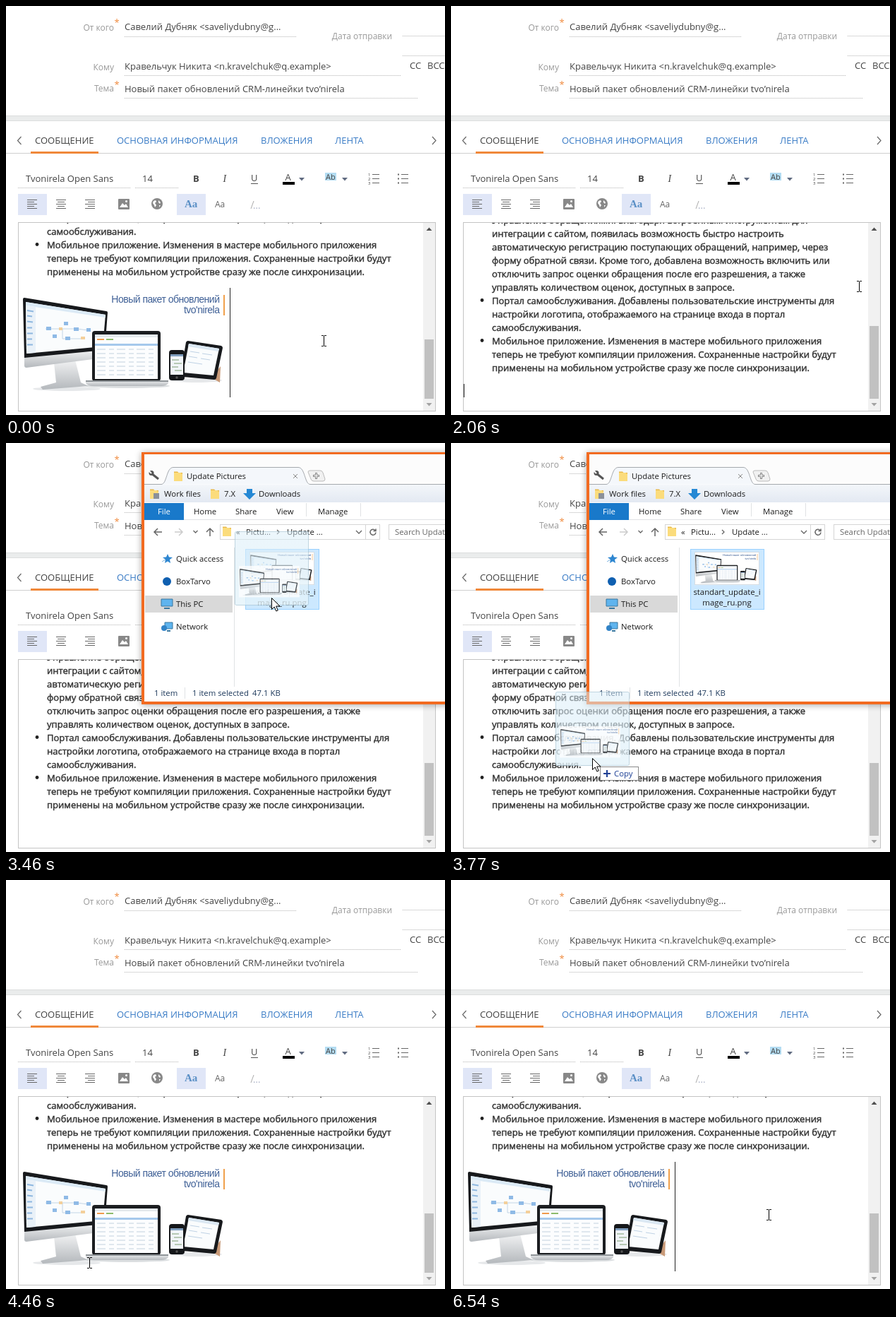
An HTML page for the animation above (6940 ms loop, 622x579 px).

```html
<!DOCTYPE html>
<html lang="ru">
<head>
<meta charset="utf-8">
<title>Вставка изображения в письмо</title>
<style>
  html, body { margin: 0; width: 100%; height: 100%; overflow: hidden; background: #fff; }
  svg { display: block; }
  text { font: 13px "Open Sans", sans-serif; fill: #444; white-space: pre; }
  .label { font-size: 12px; fill: #999; text-anchor: end; }
  .star { fill: #f0883a; }
  .tab { fill: #3a7cc6; }
  .dots { stroke: #b4b4b4; stroke-dasharray: 1 1; fill: none; shape-rendering: crispEdges; }
  .line { fill: none; stroke: #666; }
  .doc text { font-size: 13.04px; fill: #333; stroke: #333; stroke-width: .45px; }
  .win text { font-size: 11.35px; fill: #1c1c1c; }
  .win .mid { text-anchor: middle; }
  .win .status { fill: #1e395b; }
  .pic text { font: 14px "Liberation Sans", sans-serif; letter-spacing: -.5px; fill: #3f6096; text-anchor: end; }
  .thin { shape-rendering: crispEdges; }
</style>
</head>
<body>
<svg width="622" height="579" viewBox="0 0 622 579">
  <defs>
    <clipPath id="page"><rect x="18" y="307" width="573" height="266"/></clipPath>
    <linearGradient id="veil" x2="0" y2="1">
      <stop offset="0" stop-color="#d9edf8" stop-opacity=".5"/>
      <stop offset="1" stop-color="#e4f3fa" stop-opacity=".8"/>
    </linearGradient>
    <linearGradient id="metal" x2="0" y2="1">
      <stop offset="0" stop-color="#f1f2f3"/><stop offset="1" stop-color="#b4b8bc"/>
    </linearGradient>
    <linearGradient id="bar" x2="0" y2="1">
      <stop offset="0" stop-color="#f3f6fa"/><stop offset="1" stop-color="#e3e9f2"/>
    </linearGradient>
    <g id="folder">
      <path d="M0 1.5h5l1.5 1.5H12V15H0z" fill="#e9b949"/>
      <path d="M0 3h9l3 2v10H0z" fill="#fbdc7c"/>
    </g>
    <g id="pic" class="pic">
      <rect width="296" height="153" fill="#fff"/>
      <ellipse cx="66" cy="143" rx="48" ry="3" fill="#e6e8ea"/>
      <ellipse cx="152" cy="139" rx="60" ry="3" fill="#dcdfe1"/>
      <ellipse cx="250" cy="131" rx="36" ry="3" fill="#e6e8ea"/>
      <path d="M48 106l30-4 8 32 11 5-65 5-3-4 22-6z" fill="url(#metal)"/>
      <path d="M6 97l97-9v13L9 113q-3 0-3-3z" fill="url(#metal)"/>
      <path d="M4 16q0-2 2-2l116 19q2 0 2 2l-4 53L6 99z" fill="#17191c"/>
      <path d="M8 20l113 18-4 45L9 93z" fill="#fafcfd"/>
      <path d="M8 20l113 18v4L8 25z" fill="#dbeaf6"/>
      <path d="M8 25l14 2v65L9 93z" fill="#e9f1f8"/>
      <path d="M10 32l9 1.500m-9 6l7 1m-7 7l8 1m-8 8h7m-7 8h8m-8 8h7m-7 8h8" stroke="#8fb8e0" stroke-width="2"/>
      <path d="M36 58h40m-16 0v14h32m-12-14l16 2" fill="none" stroke="#b5cbe0" stroke-width=".8"/>
      <path d="M37 55h7v5h-7zM62 48h6v5h-6zM76 56h7v5h-7zM94 57h6v5h-6zM46 66h6v5h-6zM64 69h7v5h-7z" fill="#8fbae6"/>
      <path d="M55 56h5v4h-5zM86 69h6v4h-6z" fill="#f3cf9a"/>
      <rect x="102" y="61" width="97" height="71" rx="4" fill="#1b1d20"/>
      <rect x="106" y="66" width="89" height="63" fill="#fcfdfe"/>
      <path d="M106 66h89v4h-89z" fill="#e5eaee"/>
      <path d="M109 72h10v2h-10z" fill="#ef9a4c"/><path d="M122 72h10v2h-10z" fill="#8dbb6c"/>
      <path d="M106 79h89v3h-89z" fill="#a5c8ec"/>
      <path d="M109 87h82m-82 6h82m-82 6h82m-82 6h82m-82 6h82m-82 6h82m-82 6h82" stroke="#c3d1e0" stroke-dasharray="12 5 7 4" stroke-width="1.2"/>
      <path d="M93 131h117v4q-3 4-10 4h-97q-7 0-10-4z" fill="url(#metal)"/>
      <path d="M93 131h117v2H93z" fill="#8f9498"/>
      <path d="M271 127l13-16-1 23z" fill="#c99a78"/>
      <path d="M235 77q1-2 3-2l47 7q2 1 2 3l-9 43q-1 2-3 2l-45-4q-3 0-3-2z" fill="#17191c"/>
      <path d="M239 79l43 7-8 38-43-4z" fill="#fafcfd"/>
      <path d="M239 79l43 7-1 4-43-7z" fill="#dbe8f3"/>
      <path d="M241 90l13 2m4 1l14 2m-33 2l12 2m5 1l13 2m-31 3l20 3" stroke="#bfd2e5"/>
      <rect x="211" y="88" width="22" height="43" rx="4" fill="#15171a"/>
      <rect x="213" y="94" width="18" height="29" fill="#f1f5f9"/>
      <path d="M213 94h18v3h-18z" fill="#7f9dbd"/>
      <path d="M215 102h10m-7 5h11m-14 5h9m-5 5h10" stroke="#b7c9b5" stroke-width="2"/>
      <circle cx="222" cy="127" r="1.700" fill="#555"/>
      <text x="282.500" y="21">Новый пакет обновлений</text>
      <text x="282.500" y="36">tvo'nirela</text>
      <path d="M288 10h2v29h-2z" fill="#f0a04b"/>
    </g>
  </defs>

  <!-- Header -->
  <text class="label" x="153" y="35">От кого</text>
  <text class="star" x="153.500" y="28">*</text>
  <text x="168" y="34">Савелий Дубняк &lt;saveliydubny@g...</text>
  <text class="label" x="547" y="47">Дата отправки</text>
  <text class="label" x="153" y="91">Кому</text>
  <text x="168" y="90">Кравельчук Никита &lt;n.kravelchuk@q.example></text>
  <text x="572" y="89">CC</text><text x="597" y="89">BCC</text>
  <text class="label" x="153" y="121">Тема</text>
  <text class="star" x="153.500" y="116">*</text>
  <text x="168" y="122">Новый пакет обновлений CRM-линейки tvo’nirela</text>
  <path class="dots" d="M168 43.500H412M168 98.500H560M168 130.500H584M562 42.500H622M562 70.500H622M17 257.500H176M183 257.500H244"/>

  <!-- Tabs -->
  <rect y="155" width="622" height="8" fill="#eaecec"/>
  <path class="thin" d="M0 155.500H622M0 162.500H622" stroke="#dcdede"/>
  <path class="thin" d="M0 208.500H622" stroke="#cfcfcf"/>
  <rect x="35" y="206" width="96" height="3" fill="#f0883a"/>
  <path class="line" d="M21.500 185l-5 5.500 5 5.500M604 185l5 5.500-5 5.500" stroke-width="1.200"/>
  <text x="41" y="195">СООБЩЕНИЕ</text>
  <text class="tab" x="157" y="195">ОСНОВНАЯ ИНФОРМАЦИЯ</text>
  <text class="tab" x="361" y="195">ВЛОЖЕНИЯ</text>
  <text class="tab" x="466" y="195">ЛЕНТА</text>

  <!-- Toolbar -->
  <g fill="#e0e6f7">
    <rect id="listOn" x="543" y="230" width="41" height="30"/>
    <rect x="17" y="266" width="41" height="30"/><rect x="242" y="266" width="41" height="30"/>
  </g>
  <text x="28" y="249">Tvonirela Open Sans</text>
  <text x="193" y="249">14</text>
  <text x="265" y="249" style="font-weight:700">B</text>
  <text x="307.500" y="249" style="font:italic 14px 'Liberation Serif',serif">I</text>
  <text x="347" y="248">U</text><path class="thin" d="M347 251.500h10" stroke="#555"/>
  <text x="395.500" y="247">A</text><path d="M392 249h17v4h-17z" fill="#000"/>
  <path d="M415 243h8l-4 4.500zM476 243h8l-4 4.500z" fill="#5f6a80"/>
  <path d="M452 236h16v11h-16z" fill="#b3dcf2"/>
  <text x="453" y="246" style="font-size:11px">Ab</text>
  <path class="line thin" d="M519 238.500h10m-10 6h10m-10 6h10M560 238.500h10m-10 6h10m-10 6h10"/>
  <path d="M555 237.500h2v2h-2zm0 6h2v2h-2zm0 6h2v2h-2z" fill="#666"/>
  <g><text x="513" y="241" style="font-size:6px">1</text><text x="513" y="247" style="font-size:6px">2</text><text x="513" y="253" style="font-size:6px">3</text></g>
  <path class="line thin" d="M30 274.500h14m-14 3h10m-10 3h14m-14 3h10m-10 3h14M71 274.500h14m-12 3h10m-12 3h14m-12 3h10m-12 3h14M112 274.500h14m-10 3h10m-14 3h14m-10 3h10m-14 3h14"/>
  <rect x="159" y="273" width="16" height="15" rx="1" fill="#888"/>
  <path d="M161 285l4-6 3 3 2-2 3 5z" fill="#fff"/><circle cx="170.500" cy="276.500" r="1.500" fill="#fff"/>
  <circle cx="214" cy="280" r="8" fill="#888"/>
  <path d="M209 276l3-1 1 2-2 2 2 3-2 3-1-3-2-3zM216 275l3 3-1 2-2-2zM217 282h2l-2 3z" fill="#fff"/>
  <text x="253" y="285" style="font:bold 15px 'Liberation Serif',serif;fill:#5b90c6">Aa</text>
  <text x="296" y="285" style="font-size:12px;fill:#666">Aa</text>
  <path d="M347 287l4-11" stroke="#aaa"/><text x="350" y="287" style="fill:#a0a8c0">...</text>

  <!-- Editor -->
  <rect class="thin" x="17.500" y="306.500" width="591" height="267" fill="#fff" stroke="#c4c4c4"/>
  <rect x="591" y="307" width="17" height="266" fill="#f1f1f1"/>
  <path d="M595.500 318h8l-4-4.500z" fill="#505050"/><path d="M595.500 562h8l-4 4.500z" fill="#a3a3a3"/>
  <rect id="thumb" x="593" width="13" fill="#c1c1c1"/>
  <g clip-path="url(#page)">
    <g id="doc" class="doc"></g>
    <use id="inserted" href="#pic" x="20" y="399"/>
    <rect id="caret" class="thin" width="1" fill="#222"/>
  </g>

  <!-- File window -->
  <g id="win" class="win">
    <rect x="192" y="13" width="440" height="357" fill="#f26b21" style="filter:drop-shadow(0 1px 5px rgba(0,0,0,.35))"/>
    <rect x="196" y="16" width="430" height="350" fill="#fff"/>
    <path d="M196 16h430v42H196z" fill="#fcfcfc"/>
    <path d="M196 59h430v25H196z" fill="url(#bar)"/>
    <path d="M196 58.500h24c8 0 7-24 17-24h177c10 0 9 24 17 24h191" fill="#f4f7fb" stroke="#a5a9ae"/>
    <path d="M206 43l10 8" stroke="#555" stroke-width="3"/><circle cx="206" cy="42.500" r="3.500" fill="#555"/><path d="M202 39l4 4" stroke="#fcfcfc" stroke-width="2"/>
    <use href="#folder" x="238" y="39"/><text x="256" y="51">Update Pictures</text>
    <path class="line" d="M407 44l6 6m0-6l-6 6" style="stroke:#888"/>
    <path d="M428 41q0-2 3-2h14q3 0 4 3l3 9q0 3-3 3h-13q-3 0-4-3z" fill="#f1f1f1" stroke="#bbb"/>
    <path d="M439.500 42v9m-4.500-4.500h9" stroke="#888" stroke-width="3"/><path d="M439.500 43v7m-3.500-3.500h7" stroke="#fff"/>
    <use href="#folder" x="204" y="64"/><path d="M209 71h8v8h-8z" fill="#8a9099"/><text x="224" y="76">Work files</text>
    <use href="#folder" x="290" y="64"/><text x="309" y="76">7.X</text>
    <path d="M341 65h8v6h5l-9 9-9-9h5z" fill="#2588d4"/><text x="358" y="76">Downloads</text>
    <path d="M196 85h430v25H196z" fill="#fff"/>
    <path d="M196 85h56v24h-56z" fill="#1979ca"/>
    <text x="215" y="101" style="fill:#fff">File</text><text x="266" y="101">Home</text><text x="325" y="101">Share</text>
    <text x="383" y="101">View</text><text x="442" y="101">Manage</text>
    <path class="thin" d="M252 108.500H622M425.500 85v19M502.500 85v19M323.500 148V345M253.500 346v16" stroke="#e0e2e4"/>
    <path class="line" d="M221 126h-11m5-5l-5 5 5 5M289 132v-11m-5 5l5-5 5 5" stroke-width="1.500"/>
    <path class="line" d="M239 126h11m-5-5l5 5-5 5" style="stroke:#ccc" stroke-width="1.500"/>
    <path class="line" d="M265.500 124l3 3 3-3M384 123l3 3-3 3M496 124l4 4 4-4" stroke-width="1.300"/>
    <path class="thin" d="M303.500 115.500h226v21h-226zM509.500 116v21M622 115.500h-79.500v21H622" fill="none" stroke="#d5d5d5"/>
    <use href="#folder" x="307" y="117"/><text x="326" y="130">«</text>
    <text x="340" y="130">Pictu...</text><text x="398" y="130">Update ...</text>
    <path class="line" d="M523 123.500a4 4 0 1 0 1 3m0-5v3h-3.500" stroke-width="1.500"/>
    <text x="551" y="130" style="fill:#666">Search Update Pictures</text>
    <path d="M197 216h124v24H197z" fill="#d9d9d9"/>
    <path d="M229 157l2 4.500 5 .5-4 3 1 5-4-2.500-4 2.500 1-5-4-3 5-.5z" fill="#2e86d0"/><path d="M221 168l5-3" stroke="#7db4e0"/>
    <circle cx="228" cy="196" r="6" fill="#0f5fb0"/>
    <path d="M220 221h16v10h-16z" fill="#5fb4ee" stroke="#38779f"/><path d="M224 234h8" stroke="#38779f" stroke-width="2"/>
    <path d="M225 254h11v9h-11z" fill="#5fb4ee" stroke="#38779f"/><circle cx="224" cy="262" r="4" fill="#3183c7"/><path d="M228 266h5" stroke="#38779f" stroke-width="2"/>
    <text x="241" y="168">Quick access</text><text x="241" y="200">BoxTarvo</text>
    <text x="241" y="232">This PC</text><text x="241" y="264">Network</text>
    <rect id="item" class="thin" x="339.500" y="150.500" width="104" height="85"/>
    <use href="#pic" transform="translate(345 154) scale(.308)"/>
    <path class="thin" d="M345.500 154.500h91v46h-91z" fill="none" stroke="#d5dce2"/>
    <text class="mid" x="391" y="215">standart_update_i</text><text class="mid" x="391" y="230">mage_ru.png</text>
    <text class="status" x="210" y="358">1 item</text>
    <g id="picked"><text class="status" x="264" y="358">1 item selected</text><text class="status" x="349" y="358">47.1 KB</text></g>
  </g>

  <!-- Pointer -->
  <g id="pointer">
    <g id="ghost">
      <rect x="-51.500" y="-93.500" width="104" height="104" rx="2" fill="url(#veil)" stroke="#9dbccd" stroke-opacity=".6"/>
      <use href="#pic" transform="translate(-46 -45) scale(.29)" opacity=".75"/>
    </g>
    <g id="copy" class="win">
      <rect class="thin" x="11.500" y="12.500" width="54" height="19" fill="#fff" stroke="#8a8a8a"/>
      <path d="M21 17v10m-5-5h10" stroke="#1c3f94" stroke-width="2"/>
      <text x="31" y="26" style="fill:#1c3f94">Copy</text>
    </g>
    <path id="arrow" d="M.5.500v16l3.700-3.500 2.600 6 2.500-1-2.600-6h5.300z" fill="#fff" stroke="#000"/>
    <path id="beam" class="thin" d="M-3 -7.500h3m1 0h3M.5-7v14M-3 7.500h3m1 0h3" fill="none" stroke="#000"/>
  </g>
</svg>
<script>
const LOOP = 6940, STEP = 76, LINE = 19, TOP = 308, SCROLL = 136;
const $ = id => document.getElementById(id);
const show = (id, on) => { $(id).style.display = on ? '' : 'none'; };
const set = (id, attrs) => { for (const k in attrs) $(id).setAttribute(k, attrs[k]); };

const typed = 'синхронизации.';
const lines = [
  'Управление обращениями. Благодаря встроенным инструментам для',
  'интеграции с сайтом, появилась возможность быстро настроить',
  'автоматическую регистрацию поступающих обращений, например, через',
  'форму обратной связи. Кроме того, добавлена возможность включить или',
  'отключить запрос оценки обращения после его разрешения, а также',
  'управлять количеством оценок, доступных в запросе.',
  'Портал самообслуживания. Добавлены пользовательские инструменты для',
  'настройки логотипа, отображаемого на странице входа в портал',
  'самообслуживания.',
  'Мобильное приложение. Изменения в мастере мобильного приложения',
  'теперь не требуют компиляции приложения. Сохраненные настройки будут',
  'применены на мобильном устройстве сразу же после '
];
const bullet = (row, id = '') =>
  `<circle ${id} cx="44" cy="${TOP + LINE * row - 5.5}" r="2.4" fill="#222"/>`;
$('doc').innerHTML =
  lines.map((s, i) => `<text x="58" y="${TOP + LINE * i}">${s}</text>`).join('') +
  bullet(6) + bullet(9) + bullet(12, 'id="newBullet"');
const lastLine = $('doc').querySelectorAll('text')[lines.length - 1];

// Pointer moves: start time, then [step, x, y] keys
const moves = [
  [0, [[0, 450, 474]]],
  [100, [[0, 537, 518]]],
  [1830, [[0, 545, 494], [5, 600, 332]]],
  [2760, [[0, 606, 212], [3, 440, 209], [5, 386, 208]]],
  [3460, [[0, 376, 219], [4, 200, 446], [9, 90, 545]]],
  [4230, [[0, 88, 549]]],
  [4380, [[0, 88, 549], [8, 325, 489], [9, 345, 486]]],
  [5150, [[0, 364, 484], [4, 444, 475], [5, 450, 474]]]
];

function pointerAt(t) {
  const [start, keys] = moves.filter(m => m[0] <= t).pop();
  const step = Math.floor((t - start) / STEP);
  const i = keys.findIndex(k => k[0] > step);
  if (i < 0) return keys[keys.length - 1].slice(1);
  const [a, b] = [keys[i - 1], keys[i]];
  const f = (step - a[0]) / (b[0] - a[0]);
  return [1, 2].map(n => Math.round(a[n] + (b[n] - a[n]) * f));
}

function typedCount(t) {
  if (t >= 1420) return 14;
  if (t >= 1220) return Math.min(13, 11 + Math.floor((t - 1220) / 30));
  return Math.max(0, Math.floor((t - 800) / 42.2) + 1);
}

// Returns [x, y, height] or null while the caret is hidden
function caretAt(t) {
  const within = (a, b) => t >= a && t < b;
  if (t < 100 || within(5455, 6010) || t >= 6540) return [317, 399, 155];
  if (within(100, 480) || within(800, 1560))
    return [Math.round(58 + lastLine.getComputedTextLength()), 502, 19];
  if (within(1560, 1660)) return [58, 521, 19];
  if (within(1660, 2210) || within(3920, 4380)) return [18, 535, 19];
  return null;
}

function render(t) {
  const done = t < 100 || t >= 4380;
  const open = t >= 2530 && t < 4380;
  const drag = t >= 3460 && t < 4380;
  const [x, y] = pointerAt(t);

  const text = lines[lines.length - 1] + typed.slice(0, done ? 14 : typedCount(t));
  if (lastLine.textContent !== text) lastLine.textContent = text;
  set('doc', { transform: `translate(0 ${done ? -SCROLL : 0})` });
  set('thumb', done ? { y: 472, height: 84 } : { y: 453, height: 103 });
  show('inserted', done);
  show('newBullet', t >= 1560 && t < 1660);
  show('listOn', t >= 100 && t < 1830);

  const caret = caretAt(t);
  show('caret', caret);
  if (caret) set('caret', { x: caret[0], y: caret[1], height: caret[2] });

  const selected = t >= 3310, hover = t >= 2760 && x < 444;
  show('win', open);
  show('picked', selected);
  set('item', {
    fill: selected ? '#cce8ff' : hover ? '#e5f3ff' : '#fff',
    stroke: selected ? '#99d1ff' : '#b5d3e6'
  });

  const arrow = open || (t < 2530 && x >= 591);
  show('pointer', t < 2530 || t >= 2760);
  set('pointer', { transform: `translate(${x} ${y})` });
  show('arrow', arrow);
  show('beam', !arrow);
  show('ghost', drag);
  show('copy', drag && y > 370);
}

const began = performance.now();
function tick() {
  render((performance.now() - began) % LOOP);
  requestAnimationFrame(tick);
}
tick();
</script>
</body>
</html>
```
